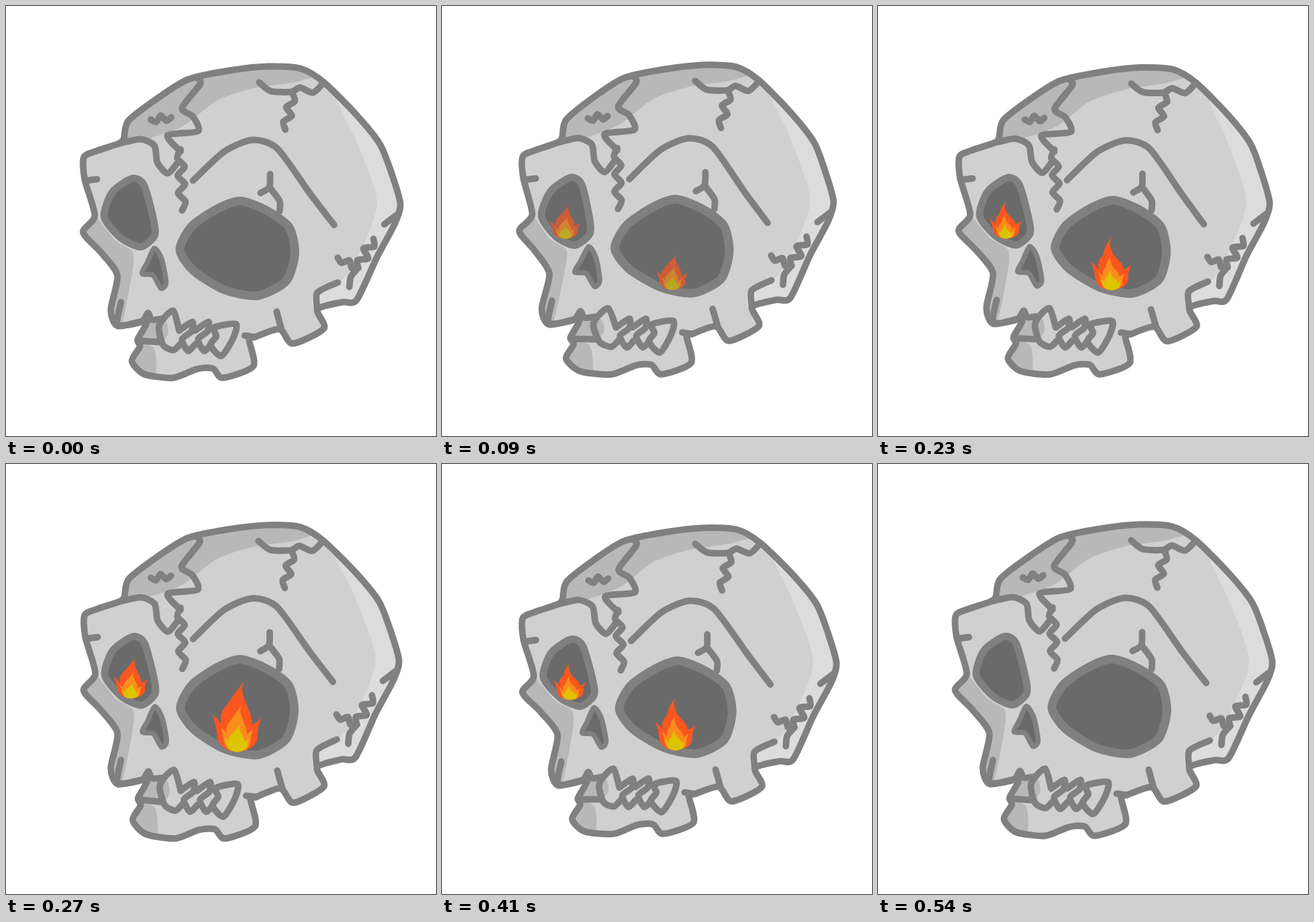
These frames come from a looping animation (591x591 px, 0.63 s). An HTML page with a canvas:

```html
<!DOCTYPE html>
<html>
<head>
<meta charset="utf-8">
<style>
html, body { margin: 0; width: 100%; height: 100%; overflow: hidden; background: #fff; }
canvas { display: block; }
</style>
</head>
<body>
<canvas id="stage" width="591" height="591"></canvas>
<script>
const ctx = document.getElementById("stage").getContext("2d");
const STEP = 90, POSES = 7, PEAK = 3;
const LINE = "#808080", BONE = "#d0d0d0", SHADE = "#b8b8b8", LIGHT = "#dcdcdc", DARK = "#6a6a6a";

// Each pin pulls the nearby bone by [dx, dy] in poses 1 to 5; poses 0 and 6 are at rest.
const pin = (x, y, ...moves) => ({ x, y, moves: [[0, 0], ...moves, [0, 0]] });
const crown = pin(290, 95, [0, -2], [0, 2], [-1, 1], [0, 5], [-11, -1]);
const brow = pin(115, 220, [4, -1], [5, -1], [1, 0], [4, 4], [11, 0]);
const chin = pin(150, 420, [-7, -2], [5, -3], [0, 0], [6, 2], [2, -2]);
const back = pin(510, 320, [-4, -3], [-4, -1], [-2, -2], [0, 2], [-4, 2]);
const jawTip = pin(260, 495, [4, -5], [7, -5], [3, 4], [6, -3], [0, 0]);
const pins = [crown, brow, chin, back, jawTip];

let pose = 0;

function warp([x, y]) {
  let dx = 0, dy = 0, sum = 0;
  for (const p of pins) {
    const w = 1 / (Math.hypot(x - p.x, y - p.y) + 10) ** 2.5;
    dx += w * p.moves[pose][0];
    dy += w * p.moves[pose][1];
    sum += w;
  }
  return [x + dx / sum, y + dy / sum];
}

const parse = text => text.trim().split(/\s+/).map(s => s.split(",").map(Number));

// Smooth curve through key points, bent by the pose.
function curve(points, closed) {
  const pts = points.map(warp), n = pts.length;
  const at = i => closed ? pts[(i + n) % n] : pts[Math.max(0, Math.min(n - 1, i))];
  const path = new Path2D();
  path.moveTo(...pts[0]);
  for (let i = 0; i < n - !closed; i++) {
    const [a, b, c, d] = [at(i - 1), at(i), at(i + 1), at(i + 2)];
    path.bezierCurveTo(b[0] + (c[0] - a[0]) / 8, b[1] + (c[1] - a[1]) / 8,
      c[0] - (d[0] - b[0]) / 8, c[1] - (d[1] - b[1]) / 8, c[0], c[1]);
  }
  return path;
}

function fill(points, color) {
  ctx.fillStyle = color;
  ctx.fill(curve(points, true));
}

function stroke(points, width = 9, closed = false) {
  ctx.lineWidth = width;
  ctx.strokeStyle = LINE;
  ctx.stroke(curve(points, closed));
}

function hole(points, width) {
  fill(points, DARK);
  stroke(points, width, true);
}

// Zigzag of n steps from one point to another.
function crack(x0, y0, x1, y1, n, size) {
  const length = Math.hypot(x1 - x0, y1 - y0);
  return Array.from({ length: n + 1 }, (_, i) => {
    const side = i % n ? size * (i % 2 ? 1 : -1) / length : 0;
    return [x0 + (x1 - x0) * i / n - (y1 - y0) * side, y0 + (y1 - y0) * i / n + (x1 - x0) * side];
  });
}

const dome = `162,182 168,158 208,127 250,101 305,89 360,83 405,86 437,105 482,150 514,190 530,230
  542,272 534,300 510,345 482,404 462,407 428,417 437,443 394,464 376,444 342,455`;
const jaw = "334,458 340,495 298,511 284,498 262,499 230,511 190,506 173,488 184,468 181,458 193,433";
const face = "154,440 144,418 153,370 130,338 106,311 122,288 108,238 107,208 125,199 155,189";
const skull = parse(`${dome} ${jaw} ${face}`);

const crownShade = parse("150,190 150,120 270,70 440,85 400,104 340,113 290,130 245,164 200,181");
const cheekShade = parse("95,290 118,285 150,322 174,338 173,370 154,450 120,430");
const jawShade = parse("165,465 203,470 203,518 165,510");
const toothShade = parse("187,440 205,432 220,434 223,450 213,462 184,461");
const backLight = parse("456,128 480,182 510,270 483,345 462,376 426,392 424,416 480,425 560,280 520,170");

const lines = [
  "155,189 185,183 204,192 208,215 222,230 236,215",
  "110,240 125,238",
  "262,98 267,107 242,140 257,152 264,172 222,178 240,200",
  "348,105 364,117 392,118 404,112 422,119 437,105",
  "257,240 300,200 339,184 373,196 418,258 451,301",
  "350,257 362,249 363,231",
  "362,249 376,268 376,282",
  "484,360 474,372 472,386",
  "520,300 537,287",
  "456,380 428,394 428,418",
  "372,420 379,446",
  "328,453 342,455",
  "158,407 154,438 186,434 195,422 200,431 213,430",
  "181,460 212,462",
  "240,464 230,473 216,466 210,443 216,430 230,419 238,446"
].map(parse);

const cracks = [
  crack(240, 197, 242, 281, 7, 5),
  crack(199, 156, 227, 153, 4, 4),
  crack(394, 120, 384, 170, 5, -5),
  crack(456, 346, 484, 360, 4, 4),
  crack(484, 360, 505, 320, 5, -6)
];

// Slanted teeth, each one a step to the right.
const tooth = parse("0,446 18,434 17,447 4,458 12,474 22,465");
const teeth = [238, 260].map(left => tooth.map(([x, y]) => [x + left, y]));
const lastTooth = parse("286,442 316,437 312,457 296,481 281,466 289,454");

const rightEye = parse(`239,335 255,303 290,279 322,268 358,281 389,304 397,340 385,378 346,398
  300,390 258,364`);
const leftEye = parse("174,237 190,247 203,295 204,316 185,331 158,319 135,290 146,256");
const nose = parse("204,333 214,348 220,380 213,388 202,370 187,368 194,353");

// One flame outline in a unit box, with its tip at t.
const tongue = t => new Path2D(`M${t} 0 C${t - .12} .12 ${t - .04} .22 ${t} .3
  C${t + .06} .42 .82 .5 .8 .62 Q.9 .6 1 .53 Q.9 .68 .92 .8 Q.88 .97 .5 1
  Q.14 .97 .1 .78 Q.08 .62 0 .48 Q.12 .54 .18 .62 Q.14 .45 .3 .35 Q${t - .22} .2 ${t} 0Z`);

// Flames grow until the middle pose, sway with every pose and are dim when small.
function flame(base, height, growth) {
  const age = Math.abs(pose - PEAK);
  if (age === PEAK) return;
  const tall = height - growth * age, wide = 18 + tall / 2;
  const tip = .6 + (pose % 2 ? .07 : -.07);
  const [x, y] = warp(base);

  function layer(color, w, h) {
    ctx.save();
    ctx.translate(x, y);
    ctx.scale(wide * w, tall * h);
    ctx.translate(-.5, -1);
    ctx.fillStyle = color;
    ctx.fill(tongue(tip));
    ctx.restore();
  }

  layer("#f95620", 1, 1);
  layer("#fc8c1c", .66, .66);
  layer("#dcc400", .5, .38);
  if (age === PEAK - 1) {
    ctx.globalAlpha = .3;
    layer(DARK, 1, 1);
    ctx.globalAlpha = 1;
  }
}

function draw() {
  ctx.clearRect(0, 0, 591, 591);
  ctx.lineCap = ctx.lineJoin = "round";
  fill(skull, BONE);
  ctx.save();
  ctx.clip(curve(skull, true));
  for (const shade of [crownShade, cheekShade, jawShade, toothShade]) fill(shade, SHADE);
  fill(backLight, LIGHT);
  ctx.restore();

  stroke(skull, 9, true);
  for (const line of [...lines, ...cracks, ...teeth]) stroke(line);
  stroke(lastTooth, 9, true);

  hole(rightEye, 12);
  hole(leftEye, 10);
  hole(nose, 7);
  flame([316, 394], 100, 25);
  flame([171, 322], 57, 5);
}

function tick() {
  pose = Math.floor(performance.now() / STEP) % POSES;
  draw();
  requestAnimationFrame(tick);
}
tick();
</script>
</body>
</html>
```
